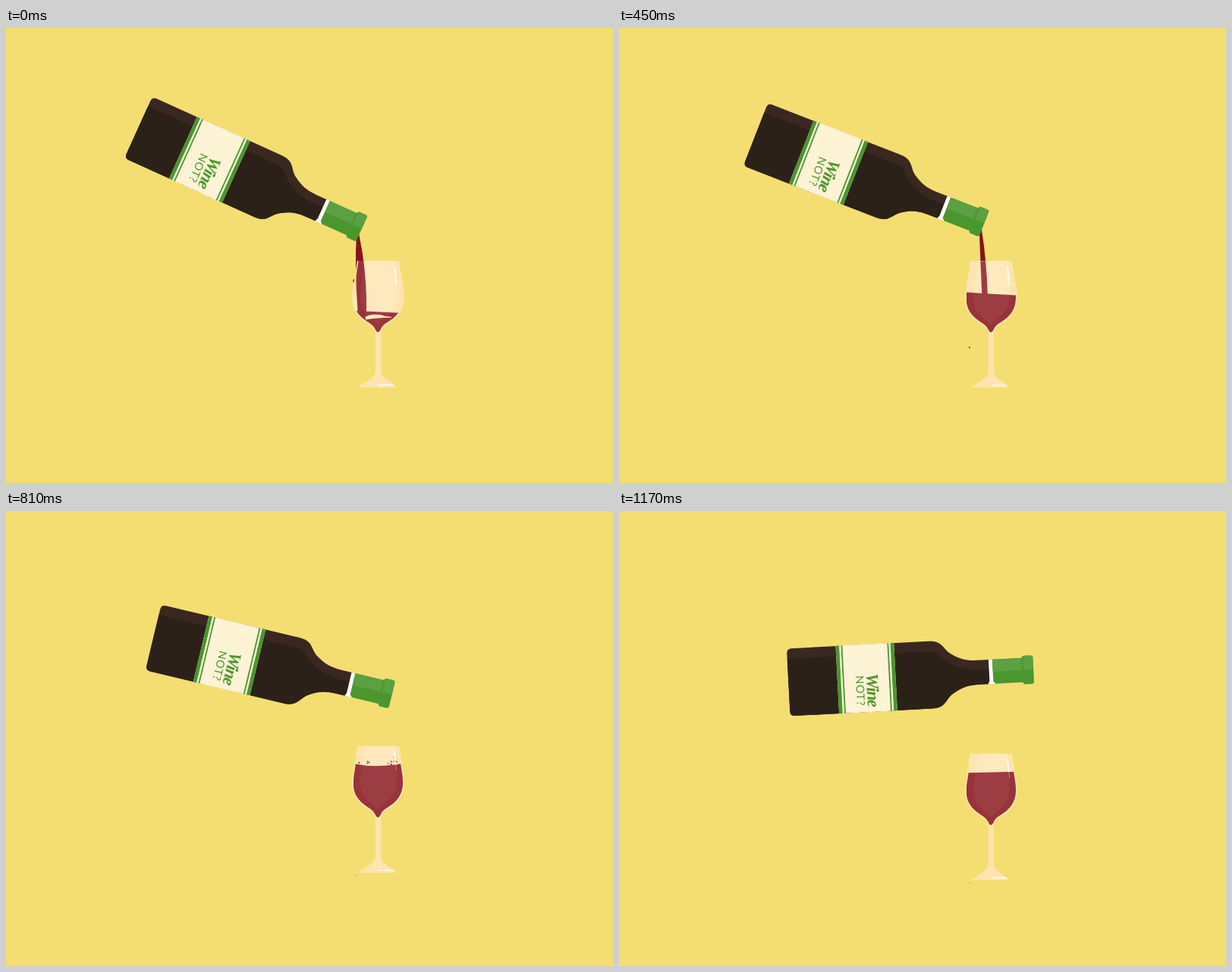
An HTML page that plays this animation: 800x600 px, repeating every 1.2 s.

```html
<!DOCTYPE html>
<html lang="en">
<head>
<meta charset="utf-8">
<title>Wine pour</title>
<style>
html, body { margin: 0; width: 100%; height: 100%; overflow: hidden; background: #f4de71; }
svg { display: block; width: 100vw; height: 100vh; }
.wine { fill: #98333a; }
.pour { fill: #86131b; }
.green { fill: #4a962f; }
.lime { fill: #5ba042; }
.script { font: italic bold 23px "Liberation Serif", serif; letter-spacing: -1.4px; }
.sans { font: 400 14.5px Lato, sans-serif; letter-spacing: .8px; }
</style>
</head>
<body>
<svg viewBox="0 0 800 600">
  <defs>
    <path id="bowl" d="M464.5 307H516.5L522.5 346C524 360 523 372 510 383C502 389 496 391 494 397Q490 405 486.5 397C484 391 478 389 470.5 383C457.5 372 456.5 360 458.5 346Z"/>
    <path id="core" d="M473 307H512L515 352C516 374 501 380 490 391C480 380 465 374 467 352Z"/>
    <path id="shine" d="M511 313L513 316L515.5 339.5L514 339Z"/>
    <path id="body" d="M-155-44.5H26C45-44.5 44-33 55-26C66-19 74-16 90-16H104V16H90C74 16 66 19 55 26C44 33 45 44.5 26 44.5H-155Q-161.3 44.5-161.3 38V-38Q-161.3-44.5-155-44.5Z"/>
    <clipPath id="inBowl"><use href="#bowl"/></clipPath>
    <clipPath id="inBody"><use href="#body"/></clipPath>
  </defs>

  <path id="stream" class="pour"/>
  <circle id="bead" class="pour" r="1.3"/>
  <ellipse id="drip" fill="#6b2416"/>

  <g id="glass">
    <path fill="#fde4b0" d="M463 307H518L524 345C526 360 525 372 511 385C505 390 497 392 494 401V450C494 463 503 463 515.5 474H464.5C477 463 487 463 487 450V401C484 392 476 390 469.5 385C455 372 455 360 457 345Z"/>
    <use href="#core" fill="#fee8bc"/>
    <use href="#shine" fill="#fff"/>
    <path d="M490 470.8H510" stroke="#fff" stroke-width="1.4" stroke-dasharray="5 1 14"/>
    <g clip-path="url(#inBowl)">
      <path id="inner" class="wine"/>
      <path id="level" class="wine"/>
      <path id="gap" fill="#fde8c0" d="M473.5 381C480 376.5 494 377 499 380L508 381V382C495 381.5 482 383.5 474 384.5Z"/>
    </g>
    <use href="#core" fill="#fff" opacity=".045"/>
    <use href="#shine" fill="#fff" opacity=".25"/>
    <g id="spray" fill="#7d1f22"></g>
  </g>

  <g id="bottle">
    <use href="#body" fill="#3a2820"/>
    <path clip-path="url(#inBody)" fill="#2c2119" d="M-162-31H26C38-31 40-22 52-15C62-8 74-4 90-4H104V46H-162Z"/>
    <path fill="#fff" d="M103.5-15.8H108.5V12L111.5 16H101.5L103.5 12Z"/>
    <path class="green" d="M108.5-16H148V16H111.5L108.5 13Z"/>
    <path class="lime" d="M108.5-16H146.5V0H108.5Z"/>
    <rect class="green" x="147.5" y="-18.8" width="14.5" height="37.6" rx="3"/>
    <path class="lime" d="M152-18.8H159Q162-18.8 162-15.8V0H149V-15.8Q149-18.8 152-18.8Z"/>
    <rect fill="#fdf3d5" x="-96.7" y="-44.8" width="76.8" height="89.6"/>
    <path class="green" d="M-96.7-44.8h4.6v89.6h-4.6zM-89.7-44.8h1.8v89.6h-1.8zM-28.7-44.8h1.8v89.6h-1.8zM-24.5-44.8h4.6v89.6h-4.6z"/>
    <g class="green" transform="rotate(90)">
      <text class="script" x="-6" y="58.5">Wine</text>
      <text class="sans" x="-4" y="72.5">NOT?</text>
    </g>
  </g>
</svg>
<script>
const LOOP = 1200, STEP = 30, LAST = LOOP - STEP;
const BREAK = 640;                 // the stream leaves the bottle
const MOUTH = { x: 160, y: 9 };    // in bottle coordinates

const $ = id => document.getElementById(id);
const set = (el, attrs) => { for (const k in attrs) el.setAttribute(k, attrs[k]); };
const clamp = v => Math.min(1, Math.max(0, v));

function bottleAt(t) {
  const u = t / LAST;
  return {
    x: 321.4 + 63 * u ** 2.04,
    y: 197.8 + 19.7 * u ** 3,
    turn: 24.4 - 27.4 * (.75 * u ** 2 + .25 * u ** 5)
  };
}

function mouthAt(t) {
  const b = bottleAt(t), a = b.turn * Math.PI / 180, c = Math.cos(a), s = Math.sin(a);
  return { x: b.x + MOUTH.x * c - MOUTH.y * s, y: b.y + MOUTH.x * s + MOUTH.y * c };
}

// Wine level rises smoothly while it rocks from side to side
function surfaceAt(t) {
  const mid = 331.5 + 21.5 * (1 + Math.cos(Math.PI * clamp(t / 830)));
  const calm = clamp((930 - t) / 240);
  const tilt = 3 * calm * Math.cos(2 * Math.PI * (t - 470) / 420) - .8;
  const dip = 4 * Math.sin(Math.PI * clamp((t - 540) / 390));
  return { mid: mid + dip / 2, left: mid - tilt - dip / 2, right: mid + tilt - dip / 2 };
}

function streamAt(t) {
  const m = mouthAt(Math.min(t, BREAK)), fall = Math.max(0, t - BREAK);
  return {
    x: m.x, end: m.x + 6, top: m.y - 2 + .33 * fall + .001 * fall ** 2,
    thin: 3, belly: 12 - .0115 * t, foot: 11 - .008 * t
  };
}

function streamShape(f, end, dy) {
  const top = f.top - dy, mid = (top + end) / 2;
  const side = k => ({
    a: f.x + k * f.thin / 2,
    m: (f.x + f.end) / 2 + .7 + k * f.belly / 2,
    b: f.end + k * f.foot / 2
  });
  const bend = p => 2 * p.m - (p.a + p.b) / 2;
  const l = side(-1), r = side(1);
  return `M${l.a} ${top}Q${bend(l)} ${mid} ${l.b} ${end}H${r.b}Q${bend(r)} ${mid} ${r.a} ${top}Z`;
}

let seed = 11;
const rand = () => (seed = seed * 16807 % 2147483647) / 2147483647;
const spray = Array.from({ length: 14 }, (_, i) => {
  const el = document.createElementNS("http://www.w3.org/2000/svg", "circle");
  const right = i % 3 > 0;
  $("spray").append(el);
  return {
    el, right, x: right ? 500 + rand() * 18 : 465 + rand() * 14,
    start: 560 + rand() * 130, life: 200 + rand() * 180,
    rise: right ? 3 + rand() * 9 : 1 + rand() * 2, r: .5 + rand() * .5
  };
});

function draw(t) {
  const b = bottleAt(t), s = surfaceAt(t), f = streamAt(t);
  const sink = 13 * (t / LAST) ** 4;
  const end = s.mid + 3, pouring = f.top < s.mid + sink;

  set($("bottle"), { transform: `translate(${b.x} ${b.y}) rotate(${b.turn})` });
  set($("glass"), { transform: `translate(0 ${sink})` });
  set($("level"), { d: `M458 ${s.left}Q490 ${2 * s.mid - (s.left + s.right) / 2} 523 ${s.right}V410H458Z` });
  set($("stream"), { d: pouring ? streamShape(f, end + sink, 0) : "M0 0" });
  set($("inner"), { d: pouring ? streamShape(f, end, sink) : "M0 0" });
  set($("gap"), { opacity: clamp(1 - t / 90) });
  set($("bead"), { cx: f.x, cy: f.top - 4, opacity: t > BREAK && pouring ? 1 : 0 });
  set($("drip"), {
    cx: 459 + 3 * clamp(t / 270),
    cy: Math.min(333.5 + .15 * t + .0001 * t * t, 477.5 + sink),
    rx: Math.max(1, 1.7 - .0022 * t),
    ry: Math.max(.35, 2.6 - .0036 * t)
  });

  for (const p of spray) {
    const u = (t - p.start) / p.life;
    const base = p.right ? s.right + (518 - p.x) * .4 : s.left;
    set(p.el, { cx: p.x, cy: base - p.rise * 4 * u * (1 - u), r: u > 0 && u < 1 ? p.r : 0 });
  }
}

const begin = performance.now();
function tick() {
  const t = (performance.now() - begin) % LOOP;
  draw(Math.floor(t / STEP) * STEP);
  requestAnimationFrame(tick);
}
tick();
</script>
</body>
</html>
```
